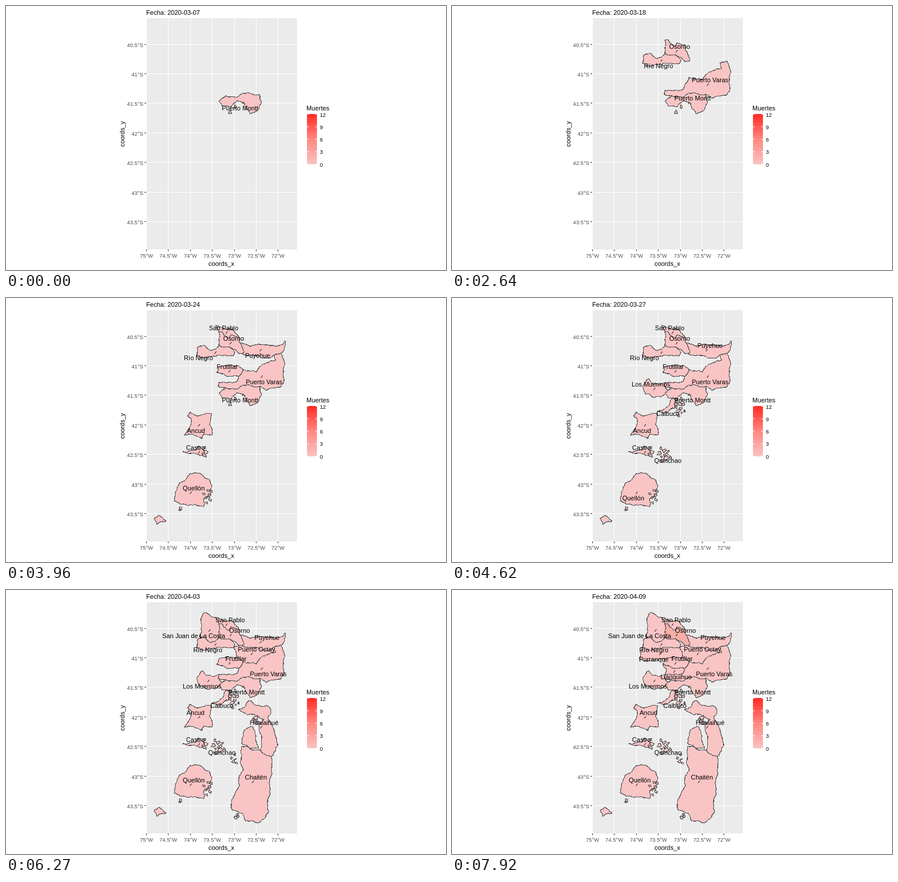
An HTML page that plays this animation: 750x450 px, repeating every 8000 ms.

```html
<!DOCTYPE html>
<html lang="es">
<head>
<meta charset="utf-8">
<title>Muertes por comuna</title>
<style>
html, body { margin: 0; width: 100%; height: 100%; overflow: hidden; background: #fff; }
svg { display: block; width: 750px; height: 450px; font: 10.85px "Liberation Sans", Arial, sans-serif; }
.small { font-size: 9.2px; }
.axis { fill: #4d4d4d; }
.land { stroke: #555; stroke-width: 1.2; stroke-linejoin: round; shape-rendering: crispEdges; }
</style>
</head>
<body>
<svg id="stage" viewBox="0 0 750 450"></svg>
<script>
const LOOP = 8000, STEP = 330, LAST = 24;
const PALE = [249, 196, 196], ONE_DEATH = [249, 174, 168];
const UP = -1, DOWN = 1, LABEL_GAP = 8.5;
const stage = document.getElementById('stage');

function add(tag, attrs, parent = stage, text) {
  const el = document.createElementNS('http://www.w3.org/2000/svg', tag);
  for (const key in attrs) el.setAttribute(key, attrs[key]);
  if (text !== undefined) el.textContent = text;
  parent.append(el);
  return el;
}
const line = (x1, y1, x2, y2, stroke, width = 1, parent = stage) =>
  add('line', { x1, y1, x2, y2, stroke, 'stroke-width': width }, parent);

// shape: corner points, "/" starts another piece; isles: [x, y, spreadX, spreadY, count]
// moves: [step, side of the anchor, sideways shift] of the name; the first one also reveals the region
const regions = [
  { name: 'San Juan de La Costa', anchor: [347, 69], moves: [[19, DOWN, -27]],
    shape: '337,39 357,47 363,58 363,70 363,81 349,90 337,80 330,80 334,62 332,50' },
  { name: 'San Pablo', anchor: [376, 59], moves: [[12, UP, -5], [18, UP, 6]],
    shape: '357,47 369,52 386,53 397,66 383,63 379,69 369,58 363,58' },
  { name: 'Osorno', anchor: [383, 77], moves: [[2, UP, 5], [19, UP, 15]], deaths: true,
    shape: '363,81 363,70 363,58 369,58 379,69 383,63 397,66 398,76 406,93 397,95 381,83' },
  { name: 'Río Negro', anchor: [357, 93], moves: [[8, DOWN, -5], [11, DOWN, -29], [15, DOWN, -5], [18, DOWN, -13]],
    shape: '349,90 363,81 381,83 390,92 388,98 368,99 355,99 336,103 324,97 326,85 337,80' },
  { name: 'Purranque', anchor: [355, 109], moves: [[20, DOWN, -11]],
    shape: '324,97 336,103 355,99 368,99 388,98 394,115 380,114 363,117 345,120 327,121 319,117' },
  { name: 'Puyehue', anchor: [434, 89], moves: [[10, DOWN, -5], [13, UP, 6], [19, UP, 11]],
    shape: '398,76 418,82 434,79 452,81 465,81 477,73 475,88 457,97 449,103 428,98 406,97 397,95 406,93' },
  { name: 'Puerto Octay', anchor: [419, 109], moves: [[15, UP, 4], [18, UP, 8]],
    shape: '388,98 397,95 406,97 428,98 449,103 457,97 460,106 445,110 427,126 404,121 394,115' },
  { name: 'Frutillar', anchor: [381, 125], moves: [[9, UP, -4], [15, DOWN, -1], [18, UP, 11]],
    shape: '363,117 380,114 394,115 404,121 397,134 378,134 359,127' },
  { name: 'Llanquihue', anchor: [379, 139], moves: [[21, DOWN, 3]],
    shape: '359,127 378,134 397,134 392,143 378,144 363,144 366,136' },
  { name: 'Puerto Varas', anchor: [436, 134], moves: [[7, UP, 4], [11, DOWN, 4], [18, DOWN, 11]],
    shape: '457,97 469,94 476,113 473,127 474,139 468,152 455,154 443,158 432,151 414,148 404,148 394,156 382,155 374,153 362,151 363,144 378,144 392,143 397,134 404,121 427,126 445,110 460,106' },
  { name: 'Los Muermos', anchor: [345, 155], moves: [[13, UP, -6], [15, UP, -23], [18, DOWN, -11]],
    shape: '326,148 335,137 341,145 363,144 362,151 369,161 357,168 345,170 330,164' },
  { name: 'Puerto Montt', anchor: [404, 165],
    moves: [[0, DOWN, -5], [1, UP, 6], [5, DOWN, 6], [6, UP, 6], [9, DOWN, -5], [13, DOWN, 6]],
    shape: '363,163 374,153 382,155 394,156 404,148 414,148 432,151 436,165 430,177 416,184 407,166 393,162 384,172 369,171 / 382,177 385,183 379,183',
    isles: [[390, 172, 1, 1, 1]] },
  { name: 'Calbuco', anchor: [375, 188], moves: [[14, DOWN, -7], [15, DOWN, -4], [18, DOWN, -7], [24, DOWN, 5]],
    shape: '374,172 383,172 380,187 366,195 350,193 364,188', isles: [[388, 188, 9, 15, 9]] },
  { name: 'Ancud', anchor: [329, 217], moves: [[12, DOWN, -5], [15, UP, 0], [18, UP, -6], [24, UP, 6]],
    shape: '309,201 314,194 325,201 341,196 351,197 347,216 351,234 337,232 334,240 320,233 304,234 312,222 315,205' },
  { name: 'Castro', anchor: [329, 263], moves: [[12, UP, -6]],
    shape: '301,262 316,260 324,259 328,252 337,259 342,271 326,266 314,265', isles: [[338, 262, 5, 8, 3]] },
  { name: 'Quinchao', anchor: [363, 268], moves: [[13, DOWN, 5]], isles: [[361, 267, 12, 13, 9]] },
  { name: 'Quellón', anchor: [315, 332], moves: [[12, UP, 5], [13, DOWN, -6], [15, UP, 5]],
    shape: '314,299 331,299 346,309 351,319 349,334 337,342 337,356 326,354 310,354 287,346 290,329 298,314 / 253,375 260,370 273,380 257,386',
    isles: [[344, 336, 8, 14, 7], [297, 359, 1, 4, 2]] },
  { name: 'Hualaihué', anchor: [435, 234], moves: [[16, DOWN, -5], [18, UP, 5]],
    shape: '396,204 408,198 416,188 426,197 444,197 452,205 446,218 455,234 461,252 463,264 452,284 434,273 436,250 431,232 440,221 425,213 412,213',
    isles: [[426, 222, 5, 7, 5]] },
  { name: 'Chaitén', anchor: [421, 327], moves: [[18, UP, 5]],
    shape: '407,238 420,233 426,250 431,270 418,270 402,262 404,250 / 402,266 420,273 434,273 452,284 453,302 451,320 450,338 447,354 446,366 448,379 440,390 426,397 408,393 404,382 386,376 384,358 391,344 398,334 397,320 404,308 401,286',
    isles: [[390, 288, 6, 10, 5], [394, 386, 5, 4, 3]] },
];

const noise = (x, y) => {
  const n = Math.sin(x * 12.9898 + y * 78.233) * 43758.5453;
  return (n - Math.floor(n) - 0.5) * 2;
};

// Midpoint displacement; an edge gives the same line in both directions, so borders coincide.
function rough(a, b) {
  const dx = b[0] - a[0], dy = b[1] - a[1];
  if (Math.hypot(dx, dy) < 3) return [a];
  if (dx < 0 || (dx === 0 && dy < 0)) return [a, ...rough(b, a).slice(1).reverse()];
  const shift = noise(a[0] + b[0], a[1] + b[1]) * 0.14;
  const mid = [(a[0] + b[0]) / 2 - dy * shift, (a[1] + b[1]) / 2 + dx * shift];
  return [...rough(a, mid), ...rough(mid, b)];
}
const closed = points => 'M' + points.map(p => p.map(v => v.toFixed(1))).join('L') + 'Z';
function coast(outline) {
  const corners = outline.trim().split(' ').map(p => p.split(',').map(Number));
  return closed(corners.flatMap((p, i) => rough(p, corners[(i + 1) % corners.length])));
}
function isle(x, y) {
  const size = 2.4 + noise(x, y) * 0.8;
  return closed(Array.from({ length: 7 }, (_, i) => {
    const angle = i * Math.PI * 2 / 7, reach = size * (1 + 0.5 * noise(x + i, y));
    return [x + Math.cos(angle) * reach, y + Math.sin(angle) * reach];
  }));
}
const scatter = ([x, y, spreadX, spreadY, count]) => Array.from({ length: count }, (_, i) => {
  const angle = i * 2.4, far = Math.sqrt((i + 0.5) / count);
  return isle(x + Math.cos(angle) * far * spreadX, y + Math.sin(angle) * far * spreadY);
}).join('');

// Panel, grid and axes
add('rect', { x: 239, y: 21, width: 257, height: 394, fill: '#ebebeb' });
for (let i = 0; i < 7; i++) {
  const x = Math.round(239 + i * 37.4) + 0.5, y = Math.round(65 + i * 50 + i * i * 0.06) + 0.5;
  line(x, 21, x, 415, '#fff', 1.1);
  line(239, y, 496, y, '#fff', 1.1);
  line(x, 415, x, 418, '#333');
  line(236, y, 239, y, '#333');
  add('text', { x, y: 429, class: 'small axis', 'text-anchor': 'middle' }, stage, 75 - i / 2 + '°W');
  add('text', { x: 234, y: y + 4, class: 'small axis', 'text-anchor': 'end' }, stage, 40.5 + i / 2 + '°S');
}
add('text', { x: 367, y: 443, 'text-anchor': 'middle' }, stage, 'coords_x');
add('text', { transform: 'translate(202 218) rotate(-90)', 'text-anchor': 'middle' }, stage, 'coords_y');
const title = add('text', { x: 239, y: 15 });

// Legend
const rgb = color => `rgb(${color})`;
const ramp = add('linearGradient', { id: 'ramp', x1: 0, y1: 0, x2: 0, y2: 1 }, add('defs', {}));
[[0, '#ff2a24'], [0.5, '#ff8780'], [1, rgb(PALE)]].forEach(([offset, color]) =>
  add('stop', { offset, 'stop-color': color }, ramp));
add('text', { x: 512, y: 178 }, stage, 'Muertes');
add('rect', { x: 513, y: 184, width: 17, height: 86, fill: 'url(#ramp)' });
for (let i = 0; i < 5; i++) {
  const y = 184.5 + i * 21.3;
  line(513, y, 516, y, '#fff');
  line(527, y, 530, y, '#fff');
  add('text', { x: 535, y: y + 4, class: 'small' }, stage, 12 - i * 3);
}

// Map below, names on top
const lands = add('g', {}), names = add('g', {});
for (const r of regions) {
  const pieces = r.shape ? r.shape.split('/').map(coast) : [];
  const d = pieces.concat((r.isles || []).map(scatter)).join('');
  const [x, y] = r.anchor;
  r.land = add('path', { d, class: 'land' }, lands);
  r.tag = add('g', {}, names);
  line(x - 1.5, y + 2, x + 1.5, y - 2, '#000', 1, r.tag);
  r.label = add('text', { 'text-anchor': 'middle' }, r.tag, r.name);
}

function show(step) {
  const day = Math.round(0.1 + 1.39 * step);
  title.textContent = 'Fecha: ' + new Date(Date.UTC(2020, 2, 7 + day)).toISOString().slice(0, 10);
  const toll = Math.max(0, (step - 19) / (LAST - 19));
  const tint = PALE.map((v, i) => Math.round(v + (ONE_DEATH[i] - v) * toll));
  for (const r of regions) {
    const move = r.moves.filter(([from]) => from <= step).pop();
    r.land.style.display = r.tag.style.display = move ? 'inline' : 'none';
    if (!move) continue;
    const [, side, shift] = move;
    r.label.setAttribute('x', r.anchor[0] + shift);
    r.label.setAttribute('y', r.anchor[1] + side * LABEL_GAP + 4);
    r.land.setAttribute('fill', rgb(r.deaths ? tint : PALE));
  }
}

let shown = -1;
function tick() {
  const step = Math.min(LAST, Math.floor(performance.now() % LOOP / STEP));
  if (step !== shown) show(shown = step);
  requestAnimationFrame(tick);
}
tick();
</script>
</body>
</html>
```
